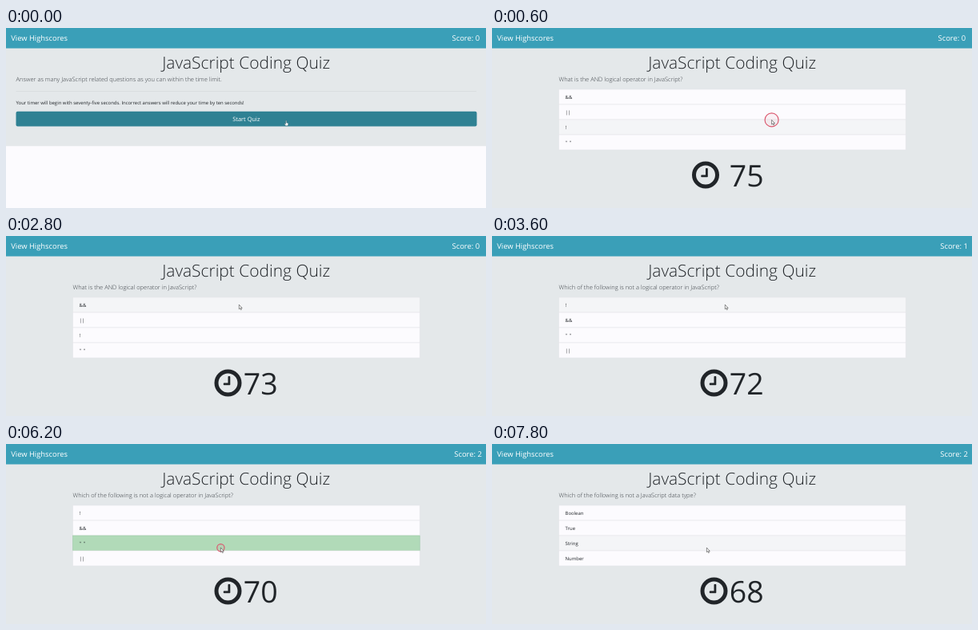
Write an HTML page that moves like this. It is 600x226 px and loops after 8000 ms.

```html
<!DOCTYPE html>
<html lang="en">
<head>
<meta charset="utf-8">
<title>JavaScript Coding Quiz</title>
<style>
  html, body { margin: 0; width: 100%; height: 100%; overflow: hidden; background: #fcfbfe; }
  svg { display: block; width: 100%; height: 100%; }
  text {
    font-family: "Open Sans", "Noto Sans", sans-serif; font-size: 5.95px;
    fill: #212529; white-space: pre; text-rendering: geometricPrecision;
  }
  .nav { font-size: 9.4px; fill: #fff; }
  .title { font-size: 20.95px; font-weight: 300; text-anchor: middle; }
  .lead { font-size: 7.5px; font-weight: 300; fill: #363b40; }
  .button { font-size: 7.45px; fill: #fff; text-anchor: middle; }
  .count { font-size: 37.5px; }
</style>
</head>
<body>
<svg viewBox="0 0 600 226" preserveAspectRatio="none">
  <rect id="panel" width="600" height="226" fill="#e4e8ea"/>
  <rect width="600" height="25.5" fill="#3a9fb8"/>
  <text class="nav" x="6.2" y="16.4">View Highscores</text>
  <text class="nav" id="score" y="16.4"></text>
  <text class="title" x="300.2" y="51.4">JavaScript Coding Quiz</text>

  <g id="intro">
    <text class="lead" x="12.6" y="67.3">Answer as many JavaScript related questions as you can within the time limit.</text>
    <path d="M12.5 79.5H588" stroke="#d6dadc" stroke-width=".7"/>
    <text x="12.6" y="96.2">Your timer will begin with seventy-five seconds. Incorrect answers will reduce your time by ten seconds!</text>
    <rect x="12.5" y="104.8" width="576" height="18.8" rx="2" fill="#2f8193"/>
    <text class="button" x="300.3" y="117.2">Start Quiz</text>
  </g>

  <g id="quiz">
    <text class="lead" id="question" x="83.5" y="67.3"></text>
    <g id="rows"></g>
    <g id="clock" fill="#212529">
      <circle r="14.5" fill="none" stroke="#212529" stroke-width="5"/>
      <path d="M.7-8.5h1.4q.7 0 .7.7v9.9q0 .7-.7.7h-7.1q-.7 0-.7-.7V.7q0-.7.7-.7H0v-7.8q0-.7.7-.7z"/>
    </g>
    <text class="count" id="count" x="296.8" y="198.6"></text>
  </g>

  <circle id="ring" fill="#e0506a" fill-opacity=".06" stroke="#db5a70" stroke-width="1.2"/>
  <path id="arrow" d="M0 0V5.6L1.3 4.5 2.2 6.5 3.1 6.1 2.2 4.2H3.9Z" fill="#fff" stroke="#444" stroke-width=".6"/>
  <path id="hand" d="M-.5-2.6q.5-.6 1 0V-.3L2.3.2Q2.8.5 2.6 1.5L2 3.5H-.7L-2 1.2Q-1.9.4-1.2.9L-.5 1.4Z"
        transform="translate(350.2 119.2)" fill="#fff" stroke="#25434c" stroke-width=".35"/>
</svg>
<script>
const LOOP = 8000, TICK = 200;
const START = 567, SECOND = 1005;         // quiz opens, countdown period
const CLICKS = [200, 3110, 6190];         // the start button, then two answers
const RING_TIME = 400, ANSWER_TIME = 450;
const ROW_TOP = 77, ROW_H = 19;
const QUOTES = '"\u00a0\u00a0"';

const quizzes = [
  { ask: 'What is the AND logical operator in JavaScript?', options: ['&&', '||', '!', QUOTES] },
  { ask: 'Which of the following is not a logical operator in JavaScript?', options: ['!', '&&', QUOTES, '||'] },
  { ask: 'Which of the following is not a JavaScript data type?', options: ['Boolean', 'True', 'String', 'Number'] }
];

// Pointer stops: each is reached between "from" and "to".
const stops = [
  { x: 349.6, y: 115.4 },
  { x: 291.3, y: 86.2, from: 800, to: 1600 },
  { x: 268.4, y: 130.2, from: 4800, to: 5600 }
];

const $ = id => document.getElementById(id);
const show = (el, on) => el.setAttribute('display', on ? 'inline' : 'none');
const place = (el, x, y) => el.setAttribute('transform', `translate(${x} ${y})`);

function ease(t, from, to) {
  const p = Math.min(1, Math.max(0, (t - from) / (to - from)));
  return p * p * (3 - 2 * p);
}

function pointer(t) {
  return stops.reduce((a, b) => {
    const p = ease(t, b.from, b.to);
    return { x: a.x + (b.x - a.x) * p, y: a.y + (b.y - a.y) * p };
  });
}

function add(parent, tag, attrs) {
  const el = document.createElementNS('http://www.w3.org/2000/svg', tag);
  for (const key in attrs) el.setAttribute(key, attrs[key]);
  return parent.appendChild(el);
}

const rows = [0, 1, 2, 3].map(i => {
  const y = ROW_TOP + i * ROW_H;
  return {
    box: add($('rows'), 'rect', { x: 83.5, y, width: 433.7, height: ROW_H, 'stroke-width': .6 }),
    label: add($('rows'), 'text', { x: 91.6, y: y + 11.5 })
  };
});

function drawQuiz(t, score, y) {
  const page = CLICKS.slice(1).filter(c => t >= c + ANSWER_TIME).length;
  const { ask, options } = quizzes[page];
  const hover = Math.floor((y - ROW_TOP) / ROW_H);
  const answered = score > page;

  $('question').textContent = ask;
  rows.forEach(({ box, label }, i) => {
    const active = i === hover;
    box.setAttribute('fill', !active ? '#fcfbfe' : answered ? '#b1dab8' : '#f4f5f7');
    box.setAttribute('stroke', active && answered ? '#9cc8a5' : '#e3e5e8');
    label.textContent = options[i];
  });

  const elapsed = Math.floor((t - START) / SECOND);
  $('count').textContent = 75 - elapsed;
  place($('clock'), elapsed ? 277.5 : 267, 184.5);
}

function draw(t) {
  const started = t >= START;
  const { x, y } = pointer(t);
  const score = CLICKS.slice(1).filter(c => t >= c).length;
  const click = CLICKS.find(c => t >= c && t <= c + RING_TIME);

  $('panel').setAttribute('height', started ? 226 : 148.3);
  show($('intro'), !started);
  show($('quiz'), started);
  show($('arrow'), started);
  show($('hand'), !started);
  $('score').textContent = 'Score: ' + score;
  $('score').setAttribute('x', score ? 560.3 : 557.6);
  if (started) drawQuiz(t, score, y);

  place($('arrow'), x, y);
  place($('ring'), x, y);
  show($('ring'), click !== undefined);
  if (click !== undefined) $('ring').setAttribute('r', 4.5 + (t - click) / 100);
}

let last = -1;
function frame(now) {
  const t = Math.floor((now % LOOP) / TICK) * TICK;
  if (t !== last) draw(last = t);
  requestAnimationFrame(frame);
}
draw(0);
requestAnimationFrame(frame);
</script>
</body>
</html>
```
